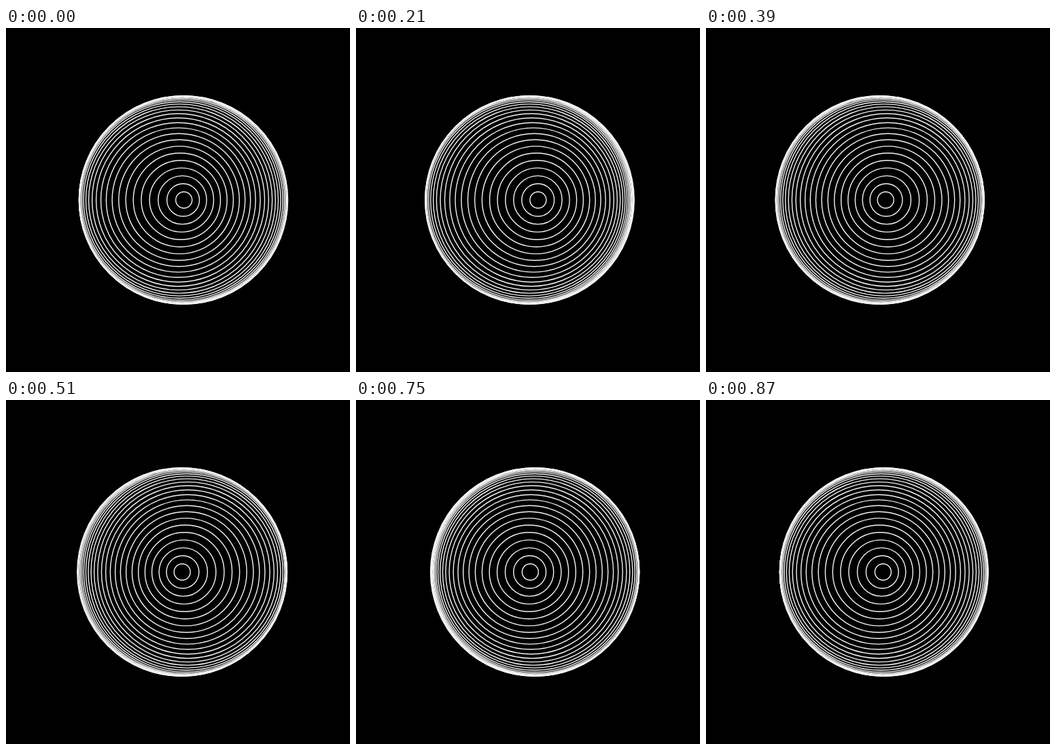
An HTML page with a canvas for the animation above (0.9 s loop, 506 by 506 pixels).

```html
<!DOCTYPE html>
<html lang="en">
<head>
<meta charset="utf-8">
<title>Swaying rings</title>
<style>
  html, body { margin: 0; width: 100%; height: 100%; overflow: hidden; background: #000; }
  canvas { display: block; width: 506px; height: 506px; }
</style>
</head>
<body>
<canvas id="stage" width="506" height="506"></canvas>
<script>
const ctx = document.getElementById('stage').getContext('2d');
const SIZE = 506, LOOP = 900, STEP = 30;
const RINGS = 25, RADIUS = 153.3, CY = 253;
const TAU = Math.PI * 2, LAG = Math.PI / 20;

// Rings crowd together towards the rim.
function radius(i) {
  const u = i / (RINGS + 0.5);
  return RADIUS * (u + Math.sin(Math.PI * u) / Math.PI);
}

// The sway travels outward, each ring a little later than the last.
function centerX(i, t) {
  const u = (i - 1) / (RINGS - 1);
  const mean = 261.7 - 2.8 * u;
  const amp = 6.2 - 2.2 * u + 2 * Math.sin(Math.PI * u);
  return mean + amp * Math.sin(TAU * t / LOOP - LAG * (i - 1));
}

function draw(t) {
  ctx.fillStyle = '#000';
  ctx.fillRect(0, 0, SIZE, SIZE);
  ctx.strokeStyle = '#f2f2f2';
  ctx.lineWidth = 1.4;
  for (let i = 1; i <= RINGS; i++) {
    ctx.beginPath();
    ctx.arc(centerX(i, t), CY, radius(i), 0, TAU);
    ctx.stroke();
  }
}

const start = performance.now();
function tick() {
  const t = (performance.now() - start) % LOOP;
  draw(Math.floor(t / STEP) * STEP);
  requestAnimationFrame(tick);
}
tick();
</script>
</body>
</html>
```
